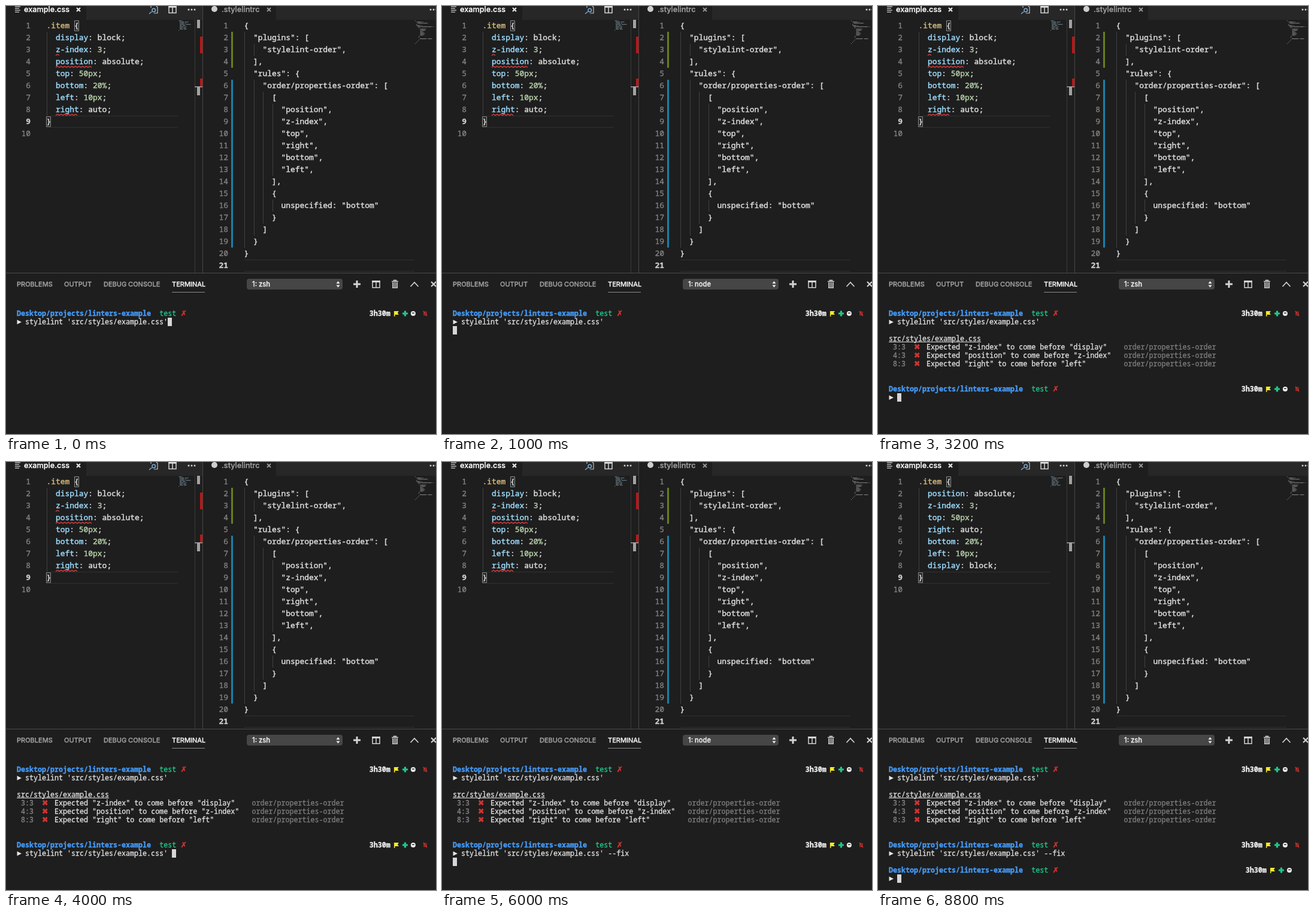
An HTML page with a canvas for the animation above (10 s loop, 718 by 714 pixels).

```html
<!DOCTYPE html>
<html lang="en">
<head>
<meta charset="utf-8">
<title>Linting in the editor</title>
<style>
  html, body { margin: 0; width: 100%; height: 100%; overflow: hidden; background: #1e1e1e; }
  canvas { display: block; }
</style>
</head>
<body>
<canvas id="stage" width="718" height="714"></canvas>
<script>
const ctx = document.getElementById('stage').getContext('2d');
const MONO = '"Noto Sans Mono", "DejaVu Sans Mono", monospace';
const UI = 'Inter, Roboto, sans-serif';
const CODE_W = 7.76, TERM_W = 7.01;
const WHITE = '#dcdcdc', RED = '#d23432', GREEN = '#1fc98a';

const beforeFix = `.item {
  display: block;
  z-index: 3;
  position: absolute;
  top: 50px;
  bottom: 20%;
  left: 10px;
  right: auto;
}
`.split('\n');
const fixedOrder = [0, 3, 2, 4, 7, 5, 6, 1, 8, 9];
const afterFix = fixedOrder.map(i => beforeFix[i]);
const config = `{
  "plugins": [
    "stylelint-order",
  ],
  "rules": {
    "order/properties-order": [
      [
        "position",
        "z-index",
        "top",
        "right",
        "bottom",
        "left",
      ],
      {
        unspecified: "bottom"
      }
    ]
  }
}
`.split('\n');

function rect(x, y, w, h, color) {
  ctx.fillStyle = color;
  ctx.fillRect(x, y, w, h);
}
// A thin outline gives the regular faces a medium weight
function text(str, x, y, color, font, align = 'left', outline = 0.45) {
  ctx.font = font;
  ctx.fillStyle = ctx.strokeStyle = color;
  ctx.textAlign = align;
  ctx.lineWidth = outline;
  ctx.lineJoin = 'round';
  ctx.fillText(str, x, y);
  ctx.strokeText(str, x, y);
  ctx.lineJoin = 'miter';
}
function stroke(path, color, width = 1) {
  ctx.strokeStyle = color;
  ctx.lineWidth = width;
  ctx.stroke(new Path2D(path));
}
function fill(path, color) {
  ctx.fillStyle = color;
  ctx.fill(new Path2D(path));
}
function disc(x, y, r, color) {
  ctx.fillStyle = color;
  ctx.beginPath();
  ctx.arc(x, y, r, 0, 7);
  ctx.fill();
}
const ui = (str, x, y, color, size) => text(str, x, y, color, `500 ${size}px ${UI}`, 'left', 0.3);
const cross = (x, y, r, color, width) =>
  stroke(`M${x - r} ${y - r}l${2 * r} ${2 * r}m0 ${-2 * r}l${-2 * r} ${2 * r}`, color, width);
const dots = (x, y) => [0, 5, 10].forEach(d => disc(x + d, y, 1.5, '#d0d0d0'));
const splitIcon = (x, y) => {
  stroke(`M${x} ${y}h12v11h-12zM${x + 6} ${y}v11`, '#d4d4d4', 1.5);
  rect(x - 0.7, y - 0.7, 13.4, 3, '#d4d4d4');
};

function tabs() {
  rect(134, 0, 194, 23, '#272728');
  rect(451, 0, 267, 23, '#272728');
  [1.5, 4.5, 7.5, 10.5].forEach((y, i) => rect(15, y - 1, i % 2 ? 7 : 9, 1.3, '#c5c5c5'));
  ui('example.css', 30, 10, '#fff', 12.7);
  cross(121, 6, 3, '#f0f0f0', 2);
  stroke('M242 3V-2h7l4 4v10h-6', '#b8c4cc', 1.2);
  stroke('M243.5 9.5l-4.5 3.5M249.5 7a2.8 2.8 0 1 1-5.6 0a2.8 2.8 0 1 1 5.6 0', '#7fb0d4', 1.4);
  splitIcon(272, 0.5);
  dots(305, 6);
  disc(348, 5, 5, '#cfcfcf');
  ui('.stylelintrc', 360, 10, '#a0a0a0', 12.7);
  cross(439, 6, 3, '#999', 1.8);
  dots(709, 6);
}

const codeY = line => 17 + 20 * line;
function lineNumbers(count, active, right) {
  for (let n = 1; n <= count; n++) {
    const on = n === active;
    text(n, right, codeY(n), on ? '#d0d0d0' : '#858585', `${on ? 700 : 400} 12.93px ${MONO}`, 'right', 0.3);
  }
}
function code(str, col, line, x0, color) {
  text(str, x0 + col * CODE_W, codeY(line), color, `12.93px ${MONO}`);
}
function minimap(lines, x, color) {
  ctx.globalAlpha = 0.5;
  lines.forEach((str, row) => [...str].forEach((ch, col) => {
    if (ch !== ' ') rect(x + col, 24 + row * 2, 1, /[\w{}[\]]/.test(ch) ? 1.2 : 0.6, color);
  }));
  ctx.globalAlpha = 1;
}
function currentLine(x, y, w) {
  rect(x, y, w, 1, '#303030');
  rect(x, y + 19, w, 1, '#303030');
}
function squiggle(col, length, line) {
  const x0 = 83 + col * CODE_W, y = 21.5 + 20 * line;
  let path = `M${x0} ${y + 1}`;
  for (let x = 3, up = true; x <= length * CODE_W; x += 3, up = !up) path += `L${x0 + x} ${up ? y - 1 : y + 1}`;
  stroke(path, '#ea4040', 1.3);
}

function cssEditor(fixed) {
  const lines = fixed ? afterFix : beforeFix;
  currentLine(75, 183, 212);
  rect(68, 43, 1, 140, '#404040');
  for (const [x, y] of [[114, 24], [67, 184]]) {
    rect(x, y, 8, 18, '#232a23');
    stroke(`M${x + .5} ${y + .5}h7v17h-7z`, '#8b8b8b');
  }
  lineNumbers(10, 9, 41);
  code('.item', 0, 1, 67.5, '#d7ba7d');
  code('{', 6, 1, 67.5, WHITE);
  code('}', 0, 9, 67.5, WHITE);
  lines.slice(1, 8).forEach((str, i) => {
    const [name, value] = str.trim().slice(0, -1).split(': ');
    const start = name.length + 4;
    code(name, 2, i + 2, 67.5, '#9cdcfe');
    code(':', start - 2, i + 2, 67.5, WHITE);
    code(value, start, i + 2, 67.5, /^\d/.test(value) ? '#b5cea8' : WHITE);
    code(';', start + value.length, i + 2, 67.5, WHITE);
  });
  minimap(lines, 288, '#a9cbe0');
  rect(315, 23, 1, 422, '#3b3b3b');
  rect(319, 23, 5, 14, '#a2a2a2');
  if (!fixed) {
    squiggle(0, 1, 3);
    squiggle(0, 8, 4);
    squiggle(0, 5, 8);
    rect(324, 51, 4, 28, '#c01414');
    rect(324, 121, 4, 13, '#c01414');
  }
  rect(315, 134, 13, 1.5, '#a2a2a2');
  rect(319, 135, 5, 14, '#a2a2a2');
}

function configEditor() {
  rect(328, 0, 1, 445, '#494949');
  currentLine(398, 423, 284);
  // Indent guides: depth, first line, last line
  [[0, 2, 19], [1, 3, 3], [1, 6, 18], [2, 7, 17], [3, 8, 13], [3, 16, 16]].forEach(([depth, from, to]) =>
    rect(Math.round(398 + depth * 2 * CODE_W), 3 + 20 * from, 1, 20 * (to - from + 1), '#404040'));
  rect(376, 43, 3, 60, '#66801c');
  rect(376, 123, 3, 280, '#1b81a8');
  lineNumbers(21, 21, 371);
  config.forEach((str, i) => {
    const body = str.trimStart();
    code(body, str.length - body.length, i + 1, 397.5, WHITE);
  });
  minimap(config, 683, '#d4d4d4');
}

function panelHeader(shell) {
  rect(0, 445, 718, 1, '#4b4b4b');
  [['PROBLEMS', 18], ['OUTPUT', 97], ['DEBUG CONSOLE', 163], ['TERMINAL', 277]].forEach(([label, x]) =>
    ui(label, x, 468, x === 277 ? '#f0f0f0' : '#a0a0a0', 11));
  rect(277, 477, 55, 1, '#8b8b8b');
  ctx.fillStyle = '#464646';
  ctx.beginPath();
  ctx.roundRect(402, 455, 160, 18, 4);
  ctx.fill();
  ui('1: ' + shell, 411, 468, '#f2f2f2', 11.2);
  fill('M551.5 463l3-4l3 4zM551.5 465.5l3 4l3-4z', '#eee');
  stroke('M580 464h12M586 458v12', '#d4d4d4', 3);
  splitIcon(612, 458.8);
  stroke('M644 459.5h11M647.5 459v-1.5h4v1.5', '#d4d4d4', 1.5);
  stroke('M645.7 461v9h7.6v-9M648.2 461v8M650.8 461v8', '#d4d4d4', 1.4);
  stroke('M675.5 468l6.5-7l6.5 7', '#d4d4d4', 1.7);
  cross(714, 464, 4, '#d4d4d4', 2.2);
}

const rowY = row => 517 + row * 14;
function term(str, col, row, color = '#e0e0e0', weight = 400) {
  text(str, 18 + col * TERM_W, rowY(row), color, `${weight} 11.68px ${MONO}`, 'left', 0.35);
}
function symbol(str, col, row) {
  text(str, 18 + col * TERM_W, rowY(row), RED, 'bold 12.5px "DejaVu Sans", sans-serif');
}
function prompt(row, command, statusCol = 84, outdated = true) {
  const x = 18 + (statusCol + 6) * TERM_W - 1, y = rowY(row) - 4;
  term('Desktop/projects/linters-example', 0, row, '#459bf8', 700);
  term('test', 34, row, GREEN);
  symbol('✗', 39, row);
  term('3h30m', statusCol, row, '#f0f0f0', 700);
  fill(`M${x} ${y - 4}h8l-2 3l2 3h-6.5v3h-1.5z`, '#f2ea2b');
  stroke(`M${x + 14} ${y}h9M${x + 18.5} ${y - 4.5}v9`, GREEN, 3.2);
  disc(x + 32, y, 4, '#f0f0f0');
  rect(x + 30, y - 1.5, 4, 1.5, '#333');
  if (outdated) {
    stroke(`M${x + 50} ${y - 2.5}h4v5h-4z`, '#a92e2c', 1.4);
    stroke(`M${x + 49} ${y - 4}l6 8`, RED, 1.3);
  }
  fill(`M18.5 ${y + 10.5}l7.5 3.7l-7.5 3.7z`, '#e6e6e6');
  term(command, 2, row + 1);
}
function report() {
  term('src/styles/example.css', 0, 3);
  rect(18, 560, 154, 1, '#dedede');
  [['3', 'z-index', 'display'], ['4', 'position', 'z-index'], ['8', 'right', 'left']].forEach(([line, first, second], i) => {
    term(`${line}:3`, 1, 4 + i, '#858585');
    symbol('✖', 6, 4 + i);
    term(`Expected "${first}" to come before "${second}"`, 9, 4 + i);
    term('order/properties-order', 56, 4 + i, '#7c7c7c');
  });
}

const lint = "stylelint 'src/styles/example.css'";
// Each step: start time, cursor column and row, shell, second command
const steps = [
  [0, 36, 1, 'zsh'],
  [1000, 0, 2, 'node'],
  [2000, 2, 10, 'zsh', ''],
  [4000, 37, 10, 'zsh', lint],
  [5000, 42, 10, 'zsh', lint + ' --fix'],
  [6000, 0, 11, 'node', lint + ' --fix'],
  [7000, 2, 13, 'zsh', lint + ' --fix'],
];

function draw(now) {
  const time = now % 10000;
  const [, col, row, shell, command] = steps.findLast(step => step[0] <= time);
  const fixed = time >= 7000;
  rect(0, 0, 718, 714, '#1e1e1e');
  tabs();
  cssEditor(fixed);
  configEditor();
  panelHeader(shell);
  prompt(0, lint);
  if (command !== undefined) {
    report();
    prompt(9, command);
  }
  if (fixed) prompt(12, '', 85, false);
  rect(Math.round(18 + col * 7), rowY(row) - 11, 7, 14, '#d6d6d6');
}

const start = performance.now();
function tick() {
  draw(performance.now() - start);
  requestAnimationFrame(tick);
}
tick();
</script>
</body>
</html>
```
